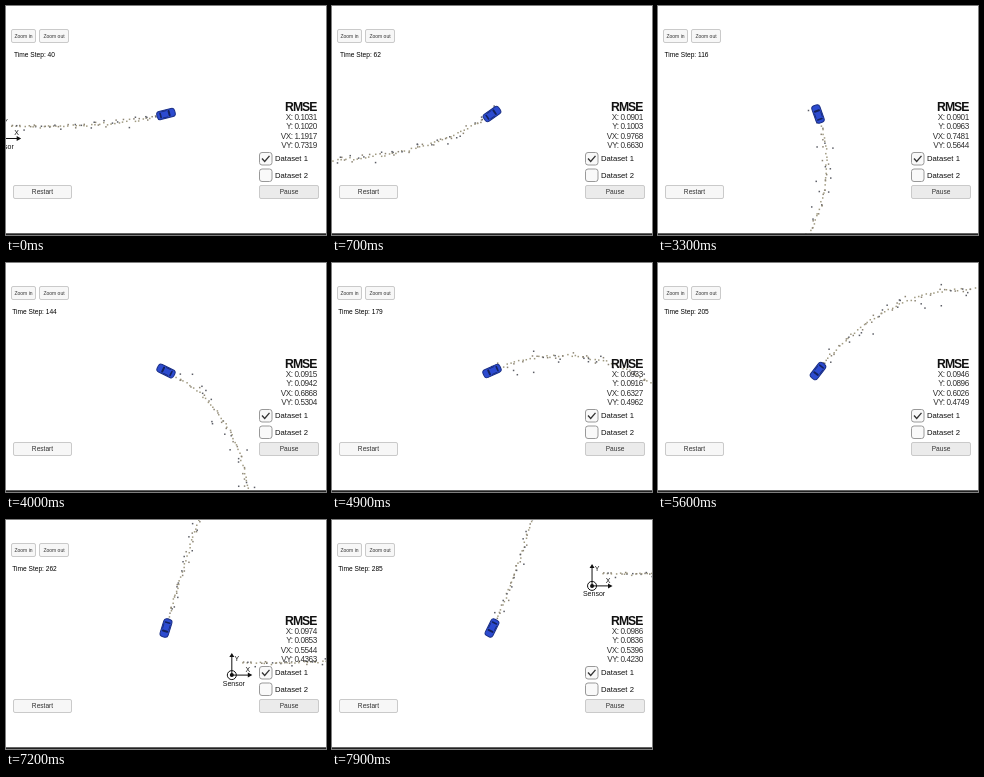
Write an HTML page with a canvas that moves like this. It is 320x229 px and loops after 8000 ms.

```html
<!DOCTYPE html>
<html>
<head>
<meta charset="utf-8">
<style>
html, body { margin: 0; width: 320px; height: 229px; overflow: hidden; background: #fff; }
canvas { display: block; }
</style>
</head>
<body>
<canvas id="stage" width="320" height="229"></canvas>
<script>
const ctx = document.getElementById('stage').getContext('2d');
const CAR = { x: 160, y: 108 };
const LAST_STEP = 285;

let seed = 11;
function random() {
  seed = (seed * 16807) % 2147483647;
  return seed / 2147483647;
}
const noise = spread => (random() + random() + random() - 1.5) * 2 * spread;

// The heading swings as a cosine while the speed grows slightly
const headingAt = step => 2.217 * (1 - Math.cos(Math.PI * (step - 2) / 250));

// Route in pixels from the sensor; each step leaves an estimate and a measurement
const route = [{ x: 8, y: -12 }];
const marks = [];
for (let step = 1; step <= LAST_STEP; step++) {
  const heading = headingAt(step - .5), speed = 3.94 + .0008 * step;
  const x = route[step - 1].x + speed * Math.cos(heading);
  const y = route[step - 1].y - speed * Math.sin(heading);
  route.push({ x, y });
  const radar = step % 2 === 0;
  const spread = radar ? 1.5 + Math.hypot(x, y) / 80 : 1.8;
  marks.push({ step, x: x + noise(.6), y: y + noise(.6), color: '#a09a80' });
  marks.push({ step, x: x + noise(spread), y: y + noise(spread), color: radar ? '#5c5e66' : '#8c8474' });
}

function stepAt(move) {
  const late = move - 15;
  return Math.round(late < 0 ? 40 + 3.14 * move : 87 + 4.19 * late - .0086 * late * late);
}

const rmse = {
  X: n => .0863 + .00005 * (n - 40) + .0168 * Math.exp((40 - n) / 12),
  Y: n => .105 - .000075 * n,
  VX: n => Math.sqrt(.10685 + 52.532 / n),
  VY: n => .7319 - .1573 * Math.log(n / 40)
};

function text(label, x, y, size, { align = 'left', color = '#111', weight = '', spacing = 0 } = {}) {
  ctx.font = `${weight} ${size}px "Liberation Sans", Arial, sans-serif`;
  ctx.letterSpacing = spacing + 'px';
  ctx.textAlign = align;
  ctx.fillStyle = color;
  ctx.fillText(label, x, y);
}

function box(x, y, w, h, radius, fill, stroke) {
  ctx.beginPath();
  ctx.roundRect(x, y, w, h, radius);
  ctx.fillStyle = fill;
  ctx.fill();
  if (stroke) {
    ctx.strokeStyle = stroke;
    ctx.stroke();
  }
}

function line(...points) {
  ctx.beginPath();
  points.forEach(([x, y]) => ctx.lineTo(x, y));
  ctx.stroke();
}

function disc(radius, paint) {
  ctx.beginPath();
  ctx.arc(0, 0, radius, 0, 7);
  ctx[paint]();
}

function button(label, x, y, w, h, size, fill = '#f7f7f7') {
  box(x + .5, y + .5, w - 1, h - 1, 1.5, fill, '#cacaca');
  text(label, x + w / 2, y + h / 2 + size * .36, size, { align: 'center', color: '#333' });
}

function checkbox(label, y, checked) {
  box(253.5, y + .5, 12.5, 12.5, 2.5, '#f9f9f9', '#999');
  text(label, 269, y + 9.2, 7.7);
  if (!checked) return;
  ctx.lineWidth = 1.3;
  ctx.strokeStyle = '#333';
  line([256, y + 6.5], [258.7, y + 9.5], [263.5, y + 3.8]);
  ctx.lineWidth = 1;
}

function drawSensor(x, y) {
  ctx.save();
  ctx.translate(x, y);
  ctx.strokeStyle = ctx.fillStyle = '#111';
  line([0, -19], [0, 0], [17, 0]);
  disc(4.5, 'stroke');
  disc(2, 'fill');
  ctx.beginPath();
  ctx.moveTo(-2.5, -18); ctx.lineTo(2.5, -18); ctx.lineTo(0, -22);
  ctx.moveTo(16, -2.5); ctx.lineTo(16, 2.5); ctx.lineTo(20.5, 0);
  ctx.fill();
  text('Y', 5, -14.5, 7, { align: 'center' });
  text('X', 16, -3, 7, { align: 'center' });
  text('Sensor', 2, 10.5, 7, { align: 'center' });
  ctx.restore();
}

function drawCar(heading) {
  ctx.save();
  ctx.translate(CAR.x, CAR.y);
  ctx.rotate(-heading);
  box(-9.2, -4.2, 18.4, 8.4, 3, '#2c4bd0', '#1a2f86');
  box(2.2, -3.2, 2, 6.4, 1, '#14225e');
  box(-6.4, -3, 1.6, 6, .8, '#14225e');
  for (const side of [-3.6, 2.8]) box(-4, side, 5.5, .8, .4, '#1a2c78');
  ctx.restore();
}

function drawPanel(step) {
  button('Zoom in', 5, 23, 25, 14, 5);
  button('Zoom out', 33, 23, 30, 14, 5);
  text('Time Step: ' + step, 28.5, 50.5, 6.6, { align: 'center', color: '#000' });
  text('RMSE', 310.3, 104.7, 12.2, { align: 'right', weight: 'bold', spacing: -1 });
  Object.entries(rmse).forEach(([name, error], i) =>
    text(`${name}: ${error(step).toFixed(4)}`, 310.8, 114 + i * 9.4, 8.2, { align: 'right', color: '#333', spacing: -.45 }));
  checkbox('Dataset 1', 146, true);
  checkbox('Dataset 2', 162.5, false);
  button('Restart', 7, 179, 59, 14, 6.6);
  button('Pause', 253, 179, 60, 14, 6.6, '#ebebeb');
  ctx.fillStyle = '#222';
  ctx.fillRect(0, 227.3, 320, 2);
}

function draw(now) {
  // The car pauses from 1.4 s to 2.6 s
  const tick = Math.floor(now % 8000 / 100);
  const step = stepAt(tick <= 14 ? tick : Math.max(14, tick - 11));
  const originX = CAR.x - route[step].x, originY = CAR.y - route[step].y;

  ctx.fillStyle = '#fff';
  ctx.fillRect(0, 0, 320, 229);
  drawSensor(originX, originY);
  for (const mark of marks) {
    if (mark.step > step) break;
    ctx.fillStyle = mark.color;
    ctx.fillRect(originX + mark.x - .75, originY + mark.y - .75, 1.5, 1.5);
  }
  drawCar(headingAt(step));
  drawPanel(step);
  requestAnimationFrame(draw);
}
draw(0);
</script>
</body>
</html>
```
